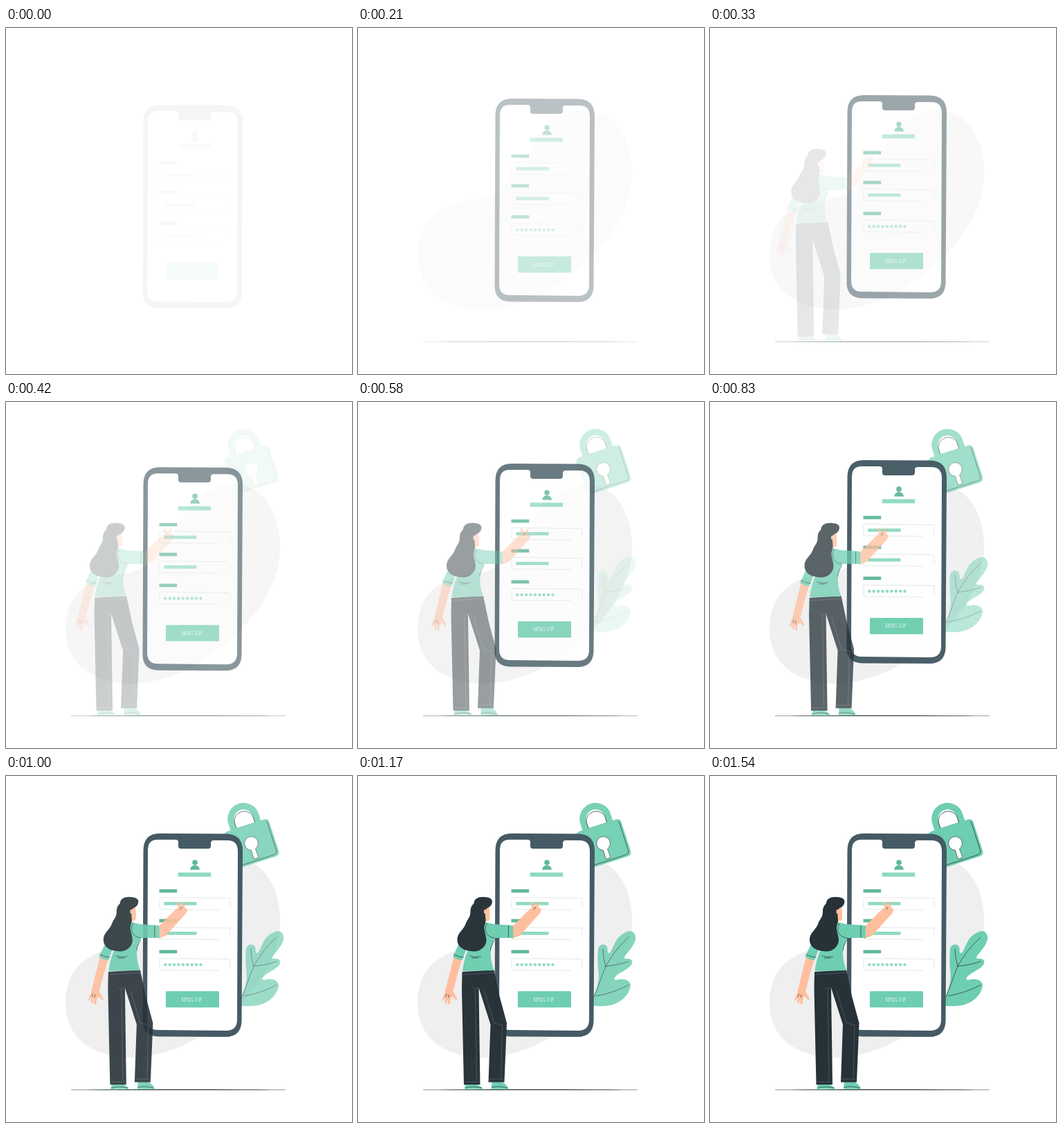
An HTML page for the animation above (1.62 s loop, 500 by 500 pixels).

```html
<!DOCTYPE html>
<html lang="en">
<head>
<meta charset="utf-8">
<title>Sign-up illustration</title>
<style>
  html, body { margin: 0; width: 100%; height: 100%; overflow: hidden; background: #fff; }
  svg { display: block; width: 100%; height: 100%; }
  .mint { fill: #6eceb1; }
  .pale { fill: #8fdac3; }
  .deep { fill: #5fb89b; }
  .dark { fill: #263238; }
  .skin { fill: #ffbe9d; }
  .line { fill: none; stroke: #263238; stroke-width: .7; stroke-linecap: round; }
  .seam { fill: none; stroke: #6d777c; stroke-width: .5; }
  .box { fill: none; stroke: #d9dddf; stroke-width: .7; }
</style>
</head>
<body>
<svg viewBox="0 0 500 500">
  <g id="backdrop">
    <path fill="#efefef" d="M86 330C86 290 104 265 138 254C165 247 184 249 204 235C236 212 246 166 284 135C315 112 352 114 374 140C392 162 397 190 396 216C393 268 360 310 330 338C285 380 235 405 184 407C120 407 87 375 86 330Z"/>
    <path d="M94 453.5H404" stroke="#263238" stroke-width=".5"/>
    <ellipse class="dark" cx="250" cy="453.4" rx="132" ry=".6"/>
  </g>

  <g id="lock">
    <g transform="translate(355 98) rotate(-18)">
      <path d="M-18.3-24V-38A18.3 18.3 0 0 1 18.3-38V-24" fill="none" stroke="#6eceb1" stroke-width="9.4"/>
      <path class="line" d="M-14-28V-38A14.5 14.5 0 0 1 14-38V-28Z"/>
      <rect class="mint" x="-34" y="-28" width="68" height="56" rx="6"/>
      <path class="line" d="M31-24V19Q31 25 25 25H-25"/>
      <path d="M-3.5 8.5A9.8 9.8 0 1 1 3 8.5L3.5 22H-3.5Z" fill="#fff" stroke="#263238" stroke-width=".6"/>
    </g>
  </g>

  <g id="leaf">
    <path class="mint" d="M340 320C347 304 349 292 347 279C346 270 346 260 347 250C348 243 357 241 360 247C361 251 360 256 363 256C366 256 369 243 375 235C381 228 388 224 394 224C399 225 402 230 401 236C399 245 392 252 386 260C383 264 386 264 390 264C396 264 398 268 395 273C390 280 377 284 372 290C368 295 372 295 377 294C387 292 394 297 394 303C392 316 381 326 369 330C360 333 349 333 340 332Z"/>
    <path class="line" d="M341 319C348 303 352 289 358 275Q371 251 391 233M358 275Q377 273 391 268M358 275Q354 263 354 250M344 318Q371 313 391 302"/>
  </g>

  <g id="phone">
    <path fill="#455a64" d="M222 83L318 83.5Q342 84 342 108L340.5 354Q340 377 317 377L220 376.5Q197 376 197.5 353L198.500 107Q199 83 222 83Z"/>
    <path fill="#fff" d="M219 92H245Q249 92 249 96V101Q249 105 253 105H292Q296 105 296 101V97Q296 93 300 93H320Q335 93 335 109L334 352Q334 368 318 368L219 367Q204 367 204 351L205 107Q205 92 219 92Z"/>
    <circle class="deep" cx="273" cy="125" r="3.8"/>
    <path class="deep" d="M266.300 135.500Q267 129 273 129Q279 129 280 135.500Z"/>
    <rect class="pale" x="248.700" y="139.500" width="47.500" height="6"/>
    <g id="fields"></g>
    <rect class="mint" x="231" y="311" width="77" height="23.500" rx="1"/>
    <text x="268" y="325.500" fill="#f1fbf8" text-anchor="middle" font-family="'Liberation Serif', serif" font-size="7.800">SING UP</text>
  </g>

  <g id="woman">
    <path class="skin" d="M139 261L131 293L126 313L122 324L124 325L127 319L126 328L128 329L131 320L130 330L133 330L135 320L138 319L142 324L144 322L140 315L138 311L144 288L151 264Z"/>
    <path class="line" stroke-width=".4" d="M127 319L129 315M131 320L132 316"/>
    <path class="skin" d="M222 219L246 195L252 190L250 184Q251 181 253 183L257 189L261 182Q263 180 263 183L261 190L265 192Q266 196 261 201L234 231L223 235Z"/>
    <path class="line" d="M257 189L255 193" stroke-width=".4"/>
    <path class="skin" d="M181 186L190 190L191 197L191 206Q190 210 186 209L186 219L177 220V190Z"/>

    <path class="mint" d="M156 446L154 452.500H181Q180 449 173 446ZM194 442L193 452.500H218Q218 448 209 442Z"/>
    <path class="line" d="M156 451Q166 447 179 451M194 450Q203 447 216 451" stroke-width=".4"/>
    <path class="dark" d="M151 283L197 280L205 318L215.500 357L212 442.500H189L192 359L175 306L177 446H153.500L150.500 308Z"/>
    <path class="seam" d="M151 287L198 284M166 306Q172 309 175 305M170 308L172 440M155 442H176M190 438H211M183 310L197 357L209 360M209 360L207 437"/>

    <path class="mint" d="M148 239L137.500 261Q144 266 151 266L158 248Z"/>
    <path class="mint" d="M178 212Q187 211 196 214L224.500 216L225 234L198 234Q195 241 193 248Q190 262 197 281L151.500 282Q153 268 158 255Z"/>
    <path class="line" d="M187 213C181 224 187 233 198 234M218 216V233M198 236Q192 247 192 252M162 260Q170 263 178 261M165 263H174M139 258Q146 262 153 262" stroke-width=".5"/>
    <path class="dark" d="M168 184C168 177 176 174 184 175C192 175 196 179 194 184C193 189 188 190 186 192C182 199 187 207 184 214C180 223 188 231 185.500 241C182 251 173 255 163 253C151 252 143 245 144 235C145 226 153 222 156 214C158 207 163 205 163 196C163 190 165 187 168 184Z"/>
    <ellipse class="skin" cx="185" cy="196" rx="2.600" ry="3.200"/>
  </g>
</svg>
<script>
const LOOP = 1620, FPS = 24, SLIDE = 30;
const layer = id => document.getElementById(id);

const row = (y, content) => `
  <rect class="deep" x="221.500" y="${y}" width="25.700" height="4.800"/>
  <path class="box" d="M308 ${y + 29.500}L224 ${y + 29}Q222 ${y + 29} 222 ${y + 27}V${y + 14}Q222 ${y + 12} 224 ${y + 12}L322 ${y + 13}Q324 ${y + 13} 324 ${y + 15}V${y + 27}"/>
  ${content}`;
const bar = y => `<rect class="pale" x="228.300" y="${y}" width="47.200" height="4.700"/>`;
const dots = y => Array.from({ length: 9 }, (_, i) =>
  `<circle class="pale" cx="${230.3 + i * 6.4}" cy="${y}" r="2.200"/>`).join('');
layer('fields').innerHTML =
  row(163.7, bar(182)) + row(206.7, bar(225)) + row(251.5, dots(272.6));

// cubic-bezier(0, 0, .58, 1)
function easeOut(x) {
  if (x <= 0) return 0;
  if (x >= 1) return 1;
  let lo = 0, hi = 1;
  for (let i = 0; i < 20; i++) {
    const s = (lo + hi) / 2;
    if (1.74 * s * s - .74 * s ** 3 < x) lo = s; else hi = s;
  }
  return 3 * lo * lo - 2 * lo ** 3;
}

// Each layer fades in over one second; dx and dy give its starting offset.
const entrances = [
  { id: 'phone', delay: 0, dx: 0, dy: SLIDE },
  { id: 'backdrop', delay: .09, dx: 0, dy: 0 },
  { id: 'woman', delay: .3, dx: -SLIDE, dy: 0 },
  { id: 'lock', delay: .4, dx: 0, dy: 0 },
  { id: 'leaf', delay: .54, dx: 0, dy: 0 }
].map(e => ({ ...e, node: layer(e.id) }));

function draw(now) {
  const ms = now % LOOP;
  const seconds = Math.floor((ms + 5) * FPS / 1000) / FPS + .033;
  for (const { node, delay, dx, dy } of entrances) {
    const p = easeOut(seconds - delay);
    node.setAttribute('opacity', p);
    node.setAttribute('transform', `translate(${dx * (1 - p)} ${dy * (1 - p)})`);
  }
}

const start = performance.now();
function tick() {
  draw(performance.now() - start);
  requestAnimationFrame(tick);
}
tick();
</script>
</body>
</html>
```
